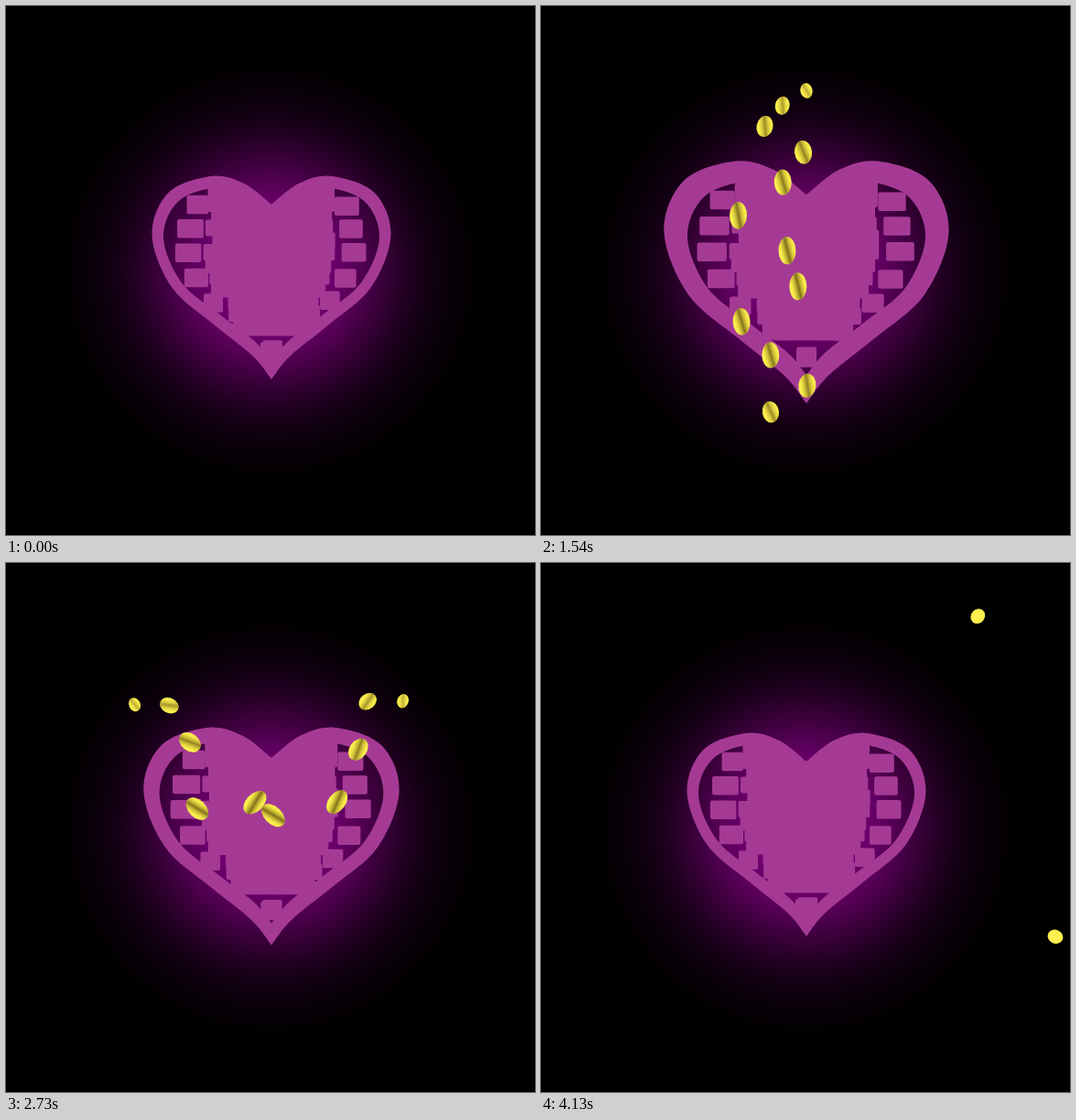
These frames come from a looping animation (578x578 px, 4.2 s). An HTML page with a canvas:

```html
<!DOCTYPE html>
<html lang="en">
<head>
<meta charset="utf-8">
<title>Beating heart</title>
<style>
html, body { margin: 0; width: 100%; height: 100%; overflow: hidden; background: #000; }
canvas { display: block; width: 578px; height: 578px; }
</style>
</head>
<body>
<canvas id="stage" width="578" height="578"></canvas>
<script>
const ctx = document.getElementById("stage").getContext("2d");
const SIZE = 578, MID = 289, AXIS = 290;
const STEP = 70, LOOP = 4200, BEAT = 1050;
const PINK = "#a53a95";
const { sin, cos, exp, max, min, abs, atan2, floor, PI } = Math;
const rad = d => d * PI / 180;
const range = n => [...Array(n).keys()];

function seeded(seed) {
  return () => (seed = seed * 16807 % 2147483647) / 2147483647;
}

// Quick swell over three steps, then a slow cosine release
function pulse(step) {
  if (step < 3) return sin(step / 3 * PI / 2) ** 1.2;
  return .5 + .5 * cos(PI * min(1, (step - 3) / 8.5));
}

// Right half of a unit heart, from notch to tip
const HALF = [[0, .14], [.23, .036], [.5, 0], [.86, .08], [1, .29],
  [.83, .55], [.47, .735], [.155, .885], [0, 1]];

function curveThrough(path, pts) {
  for (let i = 0; i < pts.length - 1; i++) {
    const a = pts[i], b = pts[i + 1];
    const before = pts[i - 1] || a, after = pts[i + 2] || b;
    path.bezierCurveTo(
      a[0] + (b[0] - before[0]) / 6, a[1] + (b[1] - before[1]) / 6,
      b[0] - (after[0] - a[0]) / 6, b[1] - (after[1] - a[1]) / 6, b[0], b[1]);
  }
}

function addHeart(path, halfWidth, top, tip) {
  const side = dir => HALF.map(([u, v]) => [AXIS + dir * u * halfWidth, top + v * (tip - top)]);
  const right = side(1), left = side(-1).reverse();
  path.moveTo(...right[0]);
  curveThrough(path, right);
  curveThrough(path, left);
  path.closePath();
}

function drawGlow() {
  const R = 270, glow = ctx.createRadialGradient(MID, MID, 0, MID, MID, R);
  for (const i of range(28)) {
    const c = 128 * exp(-((i * 10 / 134) ** 2.6));
    glow.addColorStop(i / 27, `rgb(${c}, 0, ${c})`);
  }
  ctx.fillStyle = glow;
  ctx.fillRect(0, 0, SIZE, SIZE);
}

// Seven rows: a solid middle, and one loose block at each end
function drawBlocks(k) {
  const random = seeded(41), wobble = n => (random() - .5) * n;
  for (const row of range(7)) {
    const away = row < 2 ? (2 - row) / 2 : row - 2;
    const reach = 105 * (1 - (away / 4.2) ** 1.6) * (1 + .25 * k);
    const y = 273 + (26.5 * row - 66) * (1 + .14 * k);
    const core = reach * .69, width = max(20, reach * .27);
    for (const dir of [-1, 1]) {
      const bar = (from, to, top, h) => {
        ctx.beginPath();
        ctx.roundRect(min(AXIS + dir * from, AXIS + dir * to), top, abs(to - from), h, 2);
        ctx.fill();
      };
      bar(reach - width, reach + wobble(4), y + wobble(3), 20.5);
      if (row < 6) {
        const top = row ? y : y - 30;
        bar(-1, core + wobble(9), top, y + (row < 5 ? 18 : 21) - top);
        if (row < 5) bar(-1, core - 3 + wobble(12), y + 14, 18);
      }
    }
  }
}

function drawHeart(k) {
  const edge = new Path2D(), hole = new Path2D(), scale = 1 + .352 * k;
  const outerY = y => 271.5 + (y - 271.5) * scale;
  addHeart(edge, 130.5 * scale, outerY(186), outerY(408));
  addHeart(hole, 118 + 22 * k, 198 - 12 * k, 388 + 28 * k);
  const rim = new Path2D(edge);
  rim.addPath(hole);
  ctx.fillStyle = PINK;
  ctx.save();
  ctx.clip(edge);
  drawBlocks(k);
  ctx.restore();
  ctx.fill(rim, "evenodd");
}

function drawBead(x, y, w, h, turn, shade) {
  ctx.save();
  ctx.translate(x, y);
  ctx.rotate(turn);
  ctx.scale(w / 2, h / 2);
  ctx.beginPath();
  ctx.arc(0, 0, 1, 0, 7);
  ctx.fillStyle = "#fdf04f";
  ctx.fill();
  const band = ctx.createLinearGradient(-.35, -.9, .35, .9);
  band.addColorStop(.1, "rgba(200,180,40,0)");
  band.addColorStop(.52, "rgba(112,96,20,.9)");
  band.addColorStop(.9, "rgba(200,180,40,.1)");
  ctx.globalAlpha = shade;
  ctx.fillStyle = band;
  ctx.fill();
  ctx.restore();
}

// Beads follow half circles over the front of a sphere, bulging sideways
function drawStream({ count, gap, turn, mean, peak }, time) {
  const R = 208;
  ctx.save();
  ctx.translate(MID, MID);
  ctx.rotate(rad(turn));
  for (const i of range(count)) {
    const deg = -48 + gap * i + (time - 490) / 2.8;
    if (abs(deg) > 88) continue;
    const bulge = mean + 40 * cos(rad(109 * (i - peak)));
    const s = sin(rad(deg)), c = cos(rad(deg));
    drawBead(R * s, bulge * c, 10 + 20 * c, 19 * min(1, .45 + .75 * c),
      atan2(-bulge * s, R * c) - s * .2, .3 + .7 * c);
  }
  ctx.restore();
}

// Pairs of beads fly straight out, each turned on from the last
function drawBurst(time) {
  for (const i of range(12)) {
    const turn = rad(23.6 - 74.4 * i);
    const r = (time - 649 + 80 * floor(i / 2)) * .9;
    if (r <= 0) continue;
    const size = min(1, .4 + r / 200);
    drawBead(MID + r * cos(turn), MID + r * sin(turn),
      17 * size, 15 * size, turn, max(0, 1 - r / 250));
  }
}

const beats = [
  [{ count: 12, gap: 10.8, turn: 0, mean: 20, peak: 1.1 }],
  [{ count: 12, gap: 10.8, turn: -90, mean: -37, peak: 1.1 }],
  [{ count: 8, gap: 18, turn: -45, mean: 0, peak: 1.3 },
   { count: 8, gap: 18, turn: -135, mean: -5, peak: 2.7 }],
  []
];

function draw(now) {
  const t = floor(now % LOOP / STEP) * STEP;
  const beat = floor(t / BEAT), time = t % BEAT;
  drawGlow();
  drawHeart(pulse(time / STEP));
  beats[beat].forEach(stream => drawStream(stream, time));
  if (beat === 3) drawBurst(time);
}

let origin;
function tick(now) {
  origin ??= now;
  draw(now - origin);
  requestAnimationFrame(tick);
}
draw(0);
requestAnimationFrame(tick);
</script>
</body>
</html>
```
